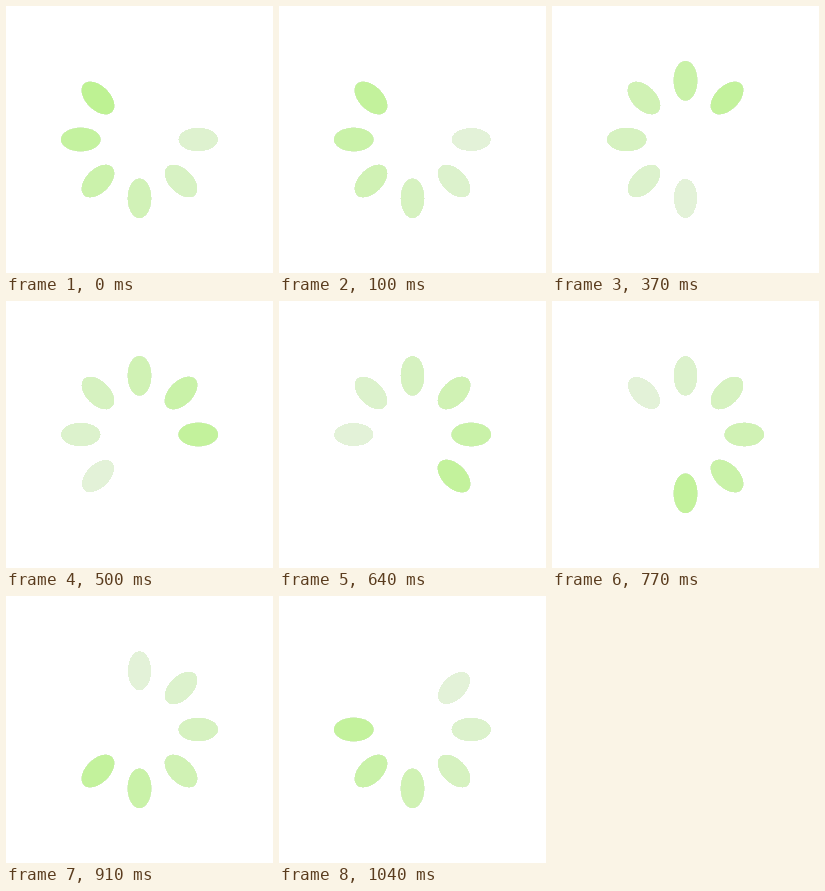
An HTML page with a canvas for the animation above (1.08 s loop, 267 by 267 pixels).

```html
<!DOCTYPE html>
<html lang="en">
<head>
<meta charset="utf-8">
<title>Spinner</title>
<style>
  html, body { margin: 0; width: 100%; height: 100%; overflow: hidden; background: #fff; }
  canvas { display: block; width: 100vw; height: 100vh; }
</style>
</head>
<body>
<canvas id="stage" width="267" height="267"></canvas>
<script>
const SIZE = 267;
const UNIT = SIZE / 100;
const LOOP = 1080;
const STEPS = 32;
const PETALS = 8;
const GREEN = [190, 242, 147];
const MATTE = [241, 242, 243];
const CUTOFF = 65; // fainter pixels stay empty

const ctx = document.getElementById('stage').getContext('2d', { willReadFrequently: true });

function drawPetal(i, opacity) {
  ctx.save();
  ctx.translate(SIZE / 2, SIZE / 2);
  ctx.rotate(i * 2 * Math.PI / PETALS);
  ctx.globalAlpha = opacity;
  ctx.beginPath();
  ctx.ellipse(0, -22 * UNIT, 4.5 * UNIT, 7.5 * UNIT, 0, 0, 2 * Math.PI);
  ctx.fill();
  ctx.restore();
}

// Blend translucent pixels with the matte, giving hard petal edges.
function flatten() {
  const img = ctx.getImageData(0, 0, SIZE, SIZE);
  const px = img.data;
  for (let p = 0; p < px.length; p += 4) {
    const a = px[p + 3];
    if (a <= CUTOFF) {
      px[p + 3] = 0;
      continue;
    }
    for (let c = 0; c < 3; c++) {
      px[p + c] = MATTE[c] + (GREEN[c] - MATTE[c]) * a / 255;
    }
    px[p + 3] = 255;
  }
  ctx.putImageData(img, 0, 0);
}

function draw(step) {
  ctx.clearRect(0, 0, SIZE, SIZE);
  ctx.fillStyle = `rgb(${GREEN})`;
  for (let i = 0; i < PETALS; i++) {
    const age = (step / STEPS + (PETALS - 1 - i) / PETALS) % 1;
    drawPetal(i, 1 - age);
  }
  flatten();
}

// Steps begin on whole hundredths of a second.
function stepAt(ms) {
  const t = Math.floor((ms % LOOP) / 10) * 10;
  return Math.floor((t + 9) * STEPS / LOOP);
}

const start = performance.now();
let shown = -1;

function tick() {
  const step = stepAt(performance.now() - start);
  if (step !== shown) {
    draw(step);
    shown = step;
  }
  requestAnimationFrame(tick);
}
tick();
</script>
</body>
</html>
```
